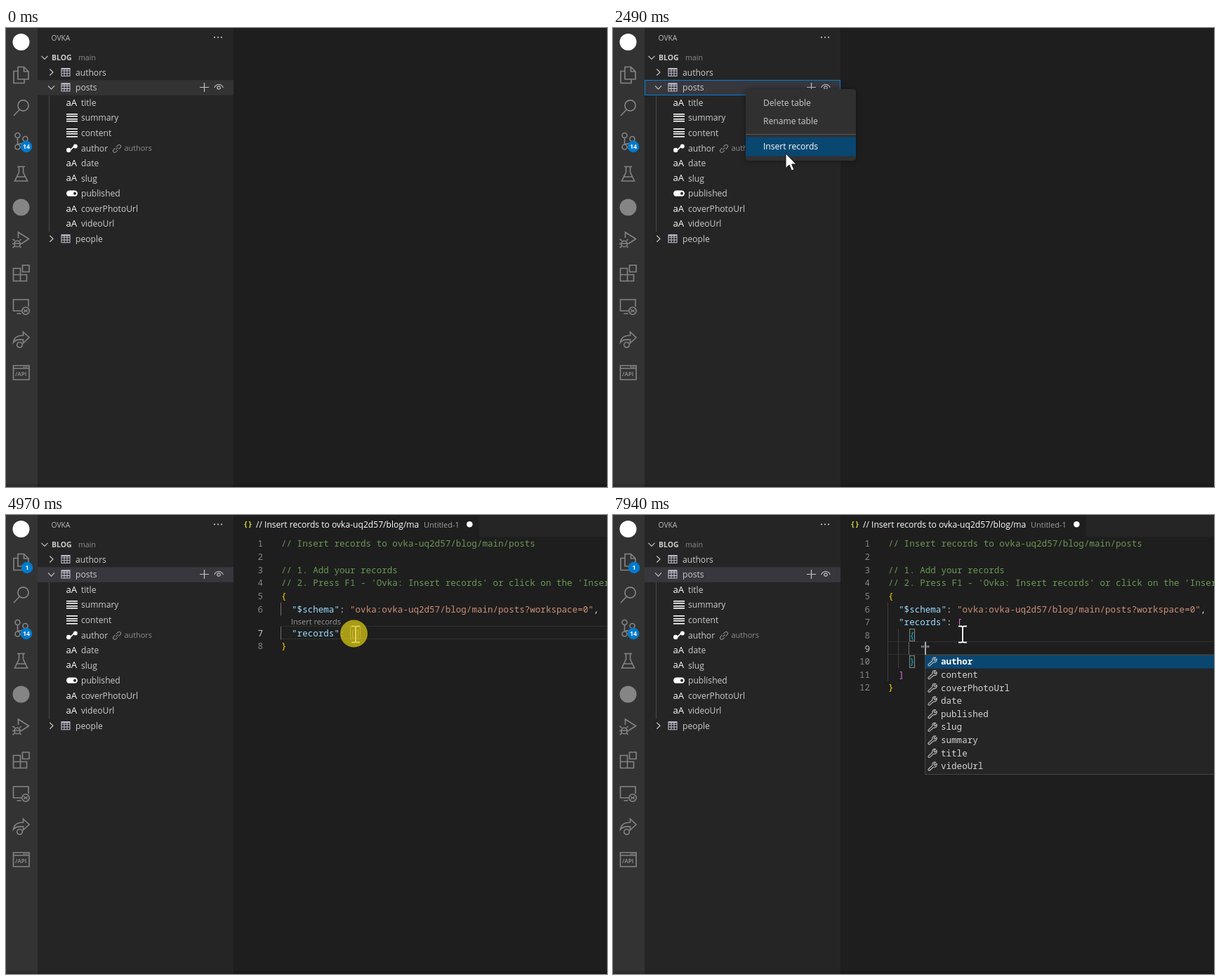
These frames come from a looping animation (856 px wide and 654 px high, 8 s). An HTML page with a canvas:

```html
<!DOCTYPE html>
<html lang="en">
<head>
<meta charset="utf-8">
<title>Insert records</title>
<style>
html, body { margin: 0; width: 100%; height: 100%; overflow: hidden; background: #1e1e1e; }
canvas { display: block; width: 856px; height: 654px; }
</style>
</head>
<body>
<canvas id="stage" width="856" height="654"></canvas>
<script>
const ctx = document.getElementById('stage').getContext('2d');
const LOOP = 8000;
const UI = '"Open Sans", "Noto Sans", sans-serif';
const MONO = '"Noto Sans Mono", "DejaVu Sans Mono", monospace';
const CODE = 12.57, CHAR = 7.54, LINE = 18.64, LENS = 15.4, LEFT = 392;
const ROW = 21.57;
const GRAY = '#858585';

// ---------- helpers ----------
function rect(x, y, w, h, color) {
  ctx.fillStyle = color;
  ctx.fillRect(x, y, w, h);
}
function frame(x, y, w, h, color) {
  ctx.strokeStyle = color;
  ctx.lineWidth = 1;
  ctx.strokeRect(x, y, w, h);
}
function disc(x, y, r, color) {
  ctx.fillStyle = color;
  ctx.beginPath();
  ctx.arc(x, y, r, 0, Math.PI * 2);
  ctx.fill();
}
function text(s, x, y, size, color, weight = 400, family = UI) {
  ctx.font = `${weight} ${size}px ${family}`;
  ctx.fillStyle = color;
  ctx.fillText(s, x, y + size * 0.35);
}
function code(s, x, y, color, weight = 500) {
  text(s, x, y, CODE, color, weight, MONO);
}
function path(d, x, y, { stroke, fill, width = 1.5 }) {
  const p = new Path2D(d);
  ctx.save();
  ctx.translate(x, y);
  if (fill) { ctx.fillStyle = fill; ctx.fill(p); }
  if (stroke) { ctx.strokeStyle = stroke; ctx.lineWidth = width; ctx.stroke(p); }
  ctx.restore();
}
const ring = (x, y, r) => `M${x + r} ${y}a${r} ${r} 0 1 0 ${-2 * r} 0a${r} ${r} 0 1 0 ${2 * r} 0Z`;

// ---------- pointer ----------
const moves = [
  { from: 220, to: 460, steps: 4, pts: [[860, 760], [719, 630], [480, 400], [330, 190], [297, 126]] },
  { from: 780, to: 1170, steps: 6, pts: [[297, 126], [250, 110], [205, 92], [188, 86]] },
  { from: 2000, to: 2630, steps: 9, pts: [[188, 86], [212, 135], [236, 205], [240, 213], [246, 181], [246, 179], [246, 178]] },
  { from: 3660, to: 4350, steps: 10, pts: [[246, 178], [242, 186], [300, 190], [400, 186], [517, 174], [505, 169]] },
  { from: 4650, to: 4830, steps: 3, pts: [[505, 169], [498, 170]] }
];
function pointerAt(t) {
  const m = moves.filter(v => t >= v.from).pop();
  if (!m) return null;
  const done = Math.floor((t - m.from) / (m.to - m.from) * (m.steps - 1)) + 1;
  const u = Math.min(1, done / m.steps) * (m.pts.length - 1);
  const i = Math.min(m.pts.length - 2, Math.floor(u));
  const [a, b] = [m.pts[i], m.pts[i + 1]];
  return { x: a[0] + (b[0] - a[0]) * (u - i), y: a[1] + (b[1] - a[1]) * (u - i) };
}
function drawPointer(t, p) {
  const menu = t >= 1620 && t < 3090;
  const look = { fill: '#fff', stroke: '#111', width: 1 };
  if (!menu && p.x < 324 && p.y < 312) {
    path('M-2.5 1C-2.5 -1.5 2 -1.5 2 1V9C3 7.5 6 8 6 10C7.5 8.7 10 9.5 10 11C12 10 14 11 14 13.5V19C14 22 12 23 12 28H-1C-1 25 -4 22 -6 18.5L-8.5 14C-9 11.5 -6.5 11 -5 13L-2.5 16Z', p.x, p.y, look);
  } else if (!menu && p.x > 324 && t >= 3180) {
    const beam = 'M-6 -11H-1.5L0 -10L1.5 -11H6M0 -10V11M-6 12H-1.5L0 11L1.5 12H6';
    path(beam, p.x, p.y - 0.5, { stroke: '#111', width: 3.6 });
    path(beam, p.x, p.y - 0.5, { stroke: '#fff', width: 2 });
  } else {
    path('M0 0V21L5 16.5L8.4 24.5L12 23L8.6 15.4H15Z', p.x, p.y - 1, look);
  }
}

// ---------- activity bar ----------
function badge(s, x, y) {
  disc(x, y, 8.3, '#007acc');
  ctx.textAlign = 'center';
  text(s, x, y, 8.8, '#fff', 700);
  ctx.textAlign = 'left';
}
const activity = [
  [67, 'M-4.5 -11.5H4L10.5 -5V6H-4.5ZM4 -11.5V-5H10.5M-4.5 -5.5H-10.5V11.5H4.5V6'],
  [114, ring(3, -3.5, 7.6) + 'M-2.3 2.2L-10.5 11'],
  [161, ring(-5, -8, 3.5) + ring(6, -3, 3.5) + ring(-5, 8.5, 3.5) + 'M-5 -4.5V5M6 .5C6 4 1 3 -4 4.5'],
  [208, 'M-5.5 -10.5H5.5M-3 -10.5V-2.5L-9 10H9L3 -2.5V-10.5M-6.2 4H6.2'],
  [302, 'M-4 -3V-11L11 -1.5L1 5' + ring(-5.5, 5.5, 4.3) + 'M-9.5 5H-1.5M-9 1L-12 -1M-2 1L0 -1M-10 5.5H-12.5M-1 5.5H1M-9 9L-12 11M-2 9L0 11'],
  [349, 'M-11 -6.5H-1V11.5H-11ZM-11 2.5H8V11.5H-1M2 -11H11.5V-1.5H2Z'],
  [397, 'M1 6H-11V-10H10.5V0M-6 10H0' + ring(6.5, 6, 5.2) + 'M4 4L6 6L4 8M9 4L7 6L9 8'],
  [444, 'M-11 4C-10 -4 -4 -6 3 -6V-11L11.5 -3L3 5V0C-4 -.5 -8 0 -11 4Z' + ring(-2, 7.5, 3.8)],
  [491, 'M-11 -10H11.5V10H-11ZM-11 -6H11.5M3 -8H5M6 -8H8M9 -8H10']
];
function drawActivity(t) {
  rect(0, 0, 45, 654, '#333333');
  disc(21.5, 20, 12, '#fff');
  for (const [y, d] of activity) path(d, 21.5, y, { stroke: GRAY, width: 1.6 });
  disc(21.5, 255.5, 12, GRAY);
  text('/API', 13, 493, 8, GRAY, 700);
  if (t >= 3180) badge('1', 30, 75);
  badge('14', 29, 169);
}

// ---------- side bar ----------
const tree = ['authors', 'posts', 'title', 'summary', 'content', 'author', 'date', 'slug',
  'published', 'coverPhotoUrl', 'videoUrl', 'people'];

function chevron(x, y, open) {
  path(open ? 'M-4.5 -2.2L0 2.5L4.5 -2.2' : 'M-2.2 -4.5L2.5 0L-2.2 4.5', x, y, { stroke: '#c5c5c5', width: 1.2 });
}
function tableIcon(y) {
  path('M-6 -5.5H6V5.5H-6ZM-6 -2H6M-6 1.8H6M-2 -5.5V5.5M2 -5.5V5.5', 85, y, { stroke: '#c0c0d0', width: 1.1 });
  rect(79, y - 6, 12, 2, '#c0c0d0');
}
function fieldIcon(name, y) {
  if (name === 'summary' || name === 'content') {
    for (let i = 0; i < 4; i++) rect(86, Math.round(y - 6.3 + i * 3.5), 16, 1.6, '#fff');
  } else if (name === 'author') {
    path('M-4 2.5C1 3 -1 -2.5 5 -3', 94, y, { stroke: '#fff', width: 1.6 });
    disc(89.2, y + 2.6, 3.2, '#fff');
    disc(98.8, y - 2.8, 3, '#fff');
  } else if (name === 'published') {
    ctx.fillStyle = '#fff';
    ctx.beginPath();
    ctx.roundRect(86, y - 4.6, 16, 8.4, 4.2);
    ctx.fill();
    disc(98, y - 0.4, 2, '#252526');
  } else {
    text('aA', 85.5, y - 0.7, 13.2, '#fff', 500);
  }
}
function drawSide(t, p) {
  rect(45, 0, 279, 654, '#252526');
  text('OVKA', 64.5, 14, 10.3, '#bbbbbb');
  for (let i = 0; i < 3; i++) disc(297 + i * 5, 13.3, 1.1, '#c5c5c5');
  chevron(55, 42, true);
  text('BLOG', 65, 42, 10.4, '#cccccc', 700);
  text('main', 103, 42, 10.6, '#8c8c8c');

  const busy = t >= 1550 && t < 3180;
  if (p && p.x < 324 && !busy) {
    path('M-3.5 -4A5.2 5.2 0 1 0 2 -4.8M-4.5 -5.5H-1.2V-2', 287, 41.5, { stroke: '#c5c5c5', width: 1.2 });
    path('M-2.5 -2.5V-5.5H5.5V2.5H2.5M-5.5 -2.5H2.5V5.5H-5.5ZM-3.5 1.5H.5', 310.5, 41, { stroke: '#c5c5c5', width: 1.1 });
  }

  rect(45, 74.3, 279, 21.5, t < 1550 ? '#333334' : '#37373d');
  if (t >= 1550 && t < 3090) frame(45.5, 74.5, 278, 21, '#007fd4');
  rect(61, 96, 1, 194, '#4a4a4a');
  path('M-6.5 0H6.5M0 -6.5V6.5', 282.5, 84.5, { stroke: '#c5c5c5', width: 1.2 });
  path('M-6.2 1C-4 -5 4 -5 6.2 1' + ring(0, 1, 2.2), 303, 84, { stroke: '#c5c5c5', width: 1.2 });

  tree.forEach((name, i) => {
    const y = 63.5 + ROW * i;
    const table = i < 2 || i === 11;
    if (table) {
      chevron(64.5, y - 0.5, i === 1);
      tableIcon(y - 0.5);
    } else {
      fieldIcon(name, y);
    }
    text(name, table ? 99 : 107, y, 12.1, '#cccccc');
  });
  const y = 63.5 + ROW * 5;
  path('M-1.5 1.5L1.5 -1.5M-1 -2.5L1.5 -4.8A2.3 2.3 0 0 1 4.8 -1.5L2.5 1M1 2.5L-1.5 4.8A2.3 2.3 0 0 1 -4.8 1.5L-2.5 -1', 158, y + 0.5, { stroke: '#8c8c8c', width: 1.1 });
  text('authors', 168.5, y + 0.3, 10.9, '#8c8c8c');
}

// ---------- context menu ----------
function drawMenu(p) {
  ctx.save();
  ctx.shadowColor = 'rgba(0,0,0,.4)';
  ctx.shadowBlur = 7;
  ctx.fillStyle = '#303031';
  ctx.beginPath();
  ctx.roundRect(189, 87, 157, 102, 4);
  ctx.fill();
  ctx.restore();
  rect(189, 151, 157, 1, '#5a5a5a');
  [['Delete table', 107], ['Rename table', 132.3], ['Insert records', 169]].forEach(([label, y]) => {
    const hot = p.x > 190 && (y > 160 ? p.y > 156 : Math.abs(p.y - y) < 12.7);
    if (hot) rect(189, y - 13.5, 157, 27, '#094771');
    text(label, 214, y, 12.1, hot ? '#ffffff' : '#cccccc');
  });
}

// ---------- editor ----------
const head = [
  '// Insert records to ovka-uq2d57/blog/main/posts',
  '',
  '// 1. Add your records',
  "// 2. Press F1 - 'Ovka: Insert records' or click on the 'Insert",
  '{',
  '  "$schema": "ovka:ovka-uq2d57/blog/main/posts?workspace=0",'
];
const bodies = [
  ['  "records": []', '}'],
  ['  "records": [', '', '  ]', '}'],
  ['  "records": [', '    {}', '  ]', '}'],
  ['  "records": [', '    {', '', '    }', '  ]', '}'],
  ['  "records": [', '    {', '      ""', '    }', '  ]', '}']
];
// [time, line, column]
const carets = [[3180, 1, 0], [4970, 7, 14], [5980, 8, 4], [6630, 8, 5], [7310, 9, 6], [7710, 9, 7]];
const hidden = [[3660, 4160], [4650, 4970], [5440, 5980], [6540, 6630], [7160, 7310]];
// matching bracket cells per stage, as [line, column]
const pairs = [[[7, 13], [7, 14]], [[7, 13], [9, 2]], [[8, 4], [8, 5]], [[8, 4], [10, 4]], [[8, 4], [10, 4]]];
const words = ['author', 'content', 'coverPhotoUrl', 'date', 'published', 'slug', 'summary', 'title', 'videoUrl'];

function codeLine(s, y) {
  if (s.startsWith('//')) return code(s, LEFT, y, '#6a9955');
  for (const m of s.matchAll(/"[^"]*"|[{}[\]:,]/g)) {
    const w = m[0], i = m.index;
    let color = '#d4d4d4';
    if (w[0] === '"') color = s[i + w.length] === ':' || w === '""' ? '#9cdcfe' : '#ce9178';
    else if ('[]'.includes(w)) color = '#da70d6';
    else if ('{}'.includes(w)) color = i ? '#179fff' : '#ffd700';
    code(w, LEFT + i * CHAR, y, color);
  }
}
function drawSuggest(y) {
  rect(444, y, 420, 171, '#252526');
  frame(444.5, y + 0.5, 420, 170, '#454545');
  words.forEach((w, i) => {
    const cy = y + 10.2 + i * LINE;
    if (!i) rect(445, y + 1, 420, LINE, '#094771');
    path('M-5.8 4.2L0 -1.2C-1 -4.5 2 -6.5 4.5 -5.5L2 -3L3.5 -1.2L6 -3.6C7 -.5 4.5 2 1.5 1.2L-4 6.2C-5.5 6.8 -6.8 5.2 -5.8 4.2Z', 455, cy - 0.5, { stroke: '#c5c5c5', width: 1.1 });
    code(w, 467, cy - 0.3, i ? '#d4d4d4' : '#ffffff', i ? 500 : 700);
  });
}
function drawEditor(t) {
  rect(324, 0, 532, 31, '#252526');
  rect(324, 0, 350, 31, '#1e1e1e');
  text('{}', 338, 13, 11, '#cbcb41', 700, MONO);
  text('// Insert records to ovka-uq2d57/blog/ma', 356, 14, 12.1, '#ffffff');
  text('Untitled-1', 595, 14.3, 11, '#a0a0a0');
  disc(660.3, 13.3, 4.3, '#fff');

  const stage = [5980, 6630, 7310, 7710].filter(v => t >= v).length;
  const lens = t >= 3500 && t < 7940;
  const lineY = n => 41 + (n - 1) * LINE + (lens && n > 6 ? LENS : 0);
  const lines = head.concat(bodies[stage]);
  const [, row, col] = carets.filter(c => t >= c[0]).pop();

  const cy = lineY(row);
  rect(392, Math.round(cy - 10), 464, 1, '#303030');
  rect(392, Math.round(cy + 8), 464, 1, '#303030');

  const active = row < 5 ? -1 : stage < 2 ? 0 : stage === 2 ? 2 : 4;
  const guide = (c, first, last) => {
    for (let n = first; n <= last; n++) {
      rect(Math.floor(LEFT - 0.8 + c * CHAR), lineY(n) - 9.3, 1, LINE, c === active ? '#707070' : '#404040');
    }
  };
  guide(0, 6, lines.length - 1);
  if (stage) guide(2, 8, lines.length - 2);
  if (stage > 2) guide(4, 9, 9);

  if (row > 4) {
    for (const [n, c] of pairs[stage]) {
      const x = Math.floor(LEFT + c * CHAR) + 0.5, y = Math.round(lineY(n) - 9) + 0.5;
      rect(x, y, 7, 17, 'rgba(0,100,0,.15)');
      frame(x, y, 7, 17, '#888888');
    }
  }
  lines.forEach((s, i) => {
    const y = lineY(i + 1);
    ctx.textAlign = 'right';
    code(i + 1, 366, y, i + 1 === row ? '#c6c6c6' : GRAY);
    ctx.textAlign = 'left';
    codeLine(s, y);
  });
  if (lens) text('Insert records', 406, 152, 11, '#999999');
  if (!hidden.some(([a, b]) => t >= a && t < b)) {
    rect(Math.round(LEFT + col * CHAR) - 1, cy - 9.5, 2, 19, '#aeafad');
  }
  if (stage === 4) drawSuggest(Math.round(lineY(9) + 9));
}

// ---------- scene ----------
const clicks = [[1550, 1620, 186, 84], [2860, 3090, 246, 176], [4970, 5210, 495.5, 169]];

function draw(t) {
  const p = pointerAt(t);
  rect(0, 0, 856, 654, '#1e1e1e');
  if (t >= 3180) drawEditor(t);
  drawSide(t, p);
  drawActivity(t);
  rect(0, 650, 856, 4, 'rgba(0,0,0,.12)');
  if (t >= 1620 && t < 3090) drawMenu(p);
  if (p) drawPointer(t, p);
  for (const [a, b, x, y] of clicks) {
    if (t >= a && t < b) disc(x, y, 19.5, 'rgba(214,197,18,.75)');
  }
}
function tick() {
  draw(performance.now() % LOOP);
  requestAnimationFrame(tick);
}
tick();
</script>
</body>
</html>
```
